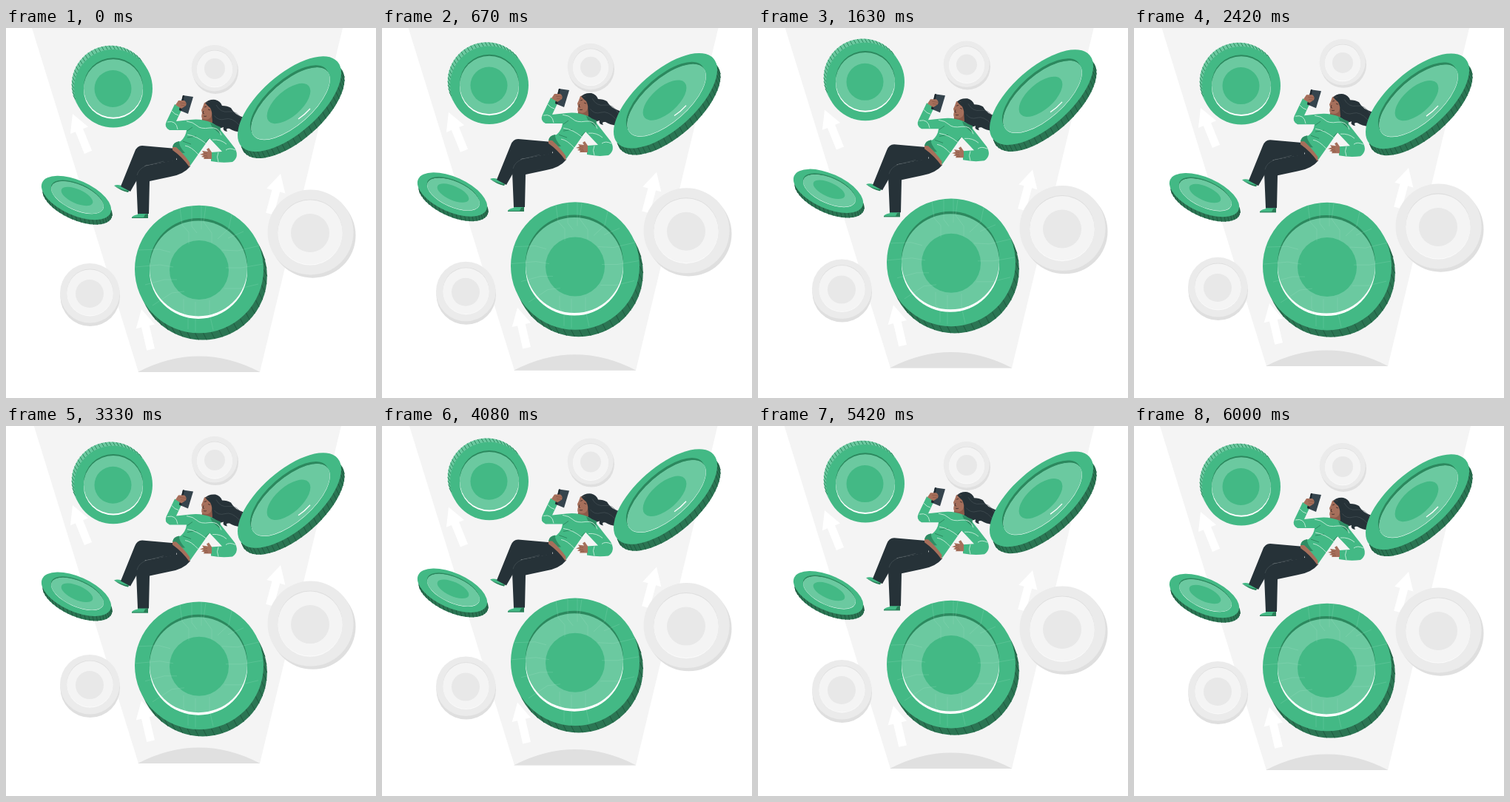
An HTML page for the animation above (6040 ms loop, 500 by 500 pixels).

```html
<!DOCTYPE html>
<html lang="en">
<head>
<meta charset="utf-8">
<title>Floating coins</title>
<style>
  html, body { margin: 0; width: 100%; height: 100%; overflow: hidden; background: #fff; }
  svg { display: block; width: 100vw; height: 100vh; }
</style>
</head>
<body>
<svg viewBox="0 0 500 500">
  <defs>
    <path id="arrow" d="M0 0L13 24H5.5V56H-5.5V24H-13Z" fill="#fff"/>
  </defs>

  <g id="backdrop">
    <path d="M35 0L179 465H343L455 0Z" fill="#f4f4f4"/>
    <path d="M178 465Q261 422 343.500 465Z" fill="#e0e0e0"/>
    <use href="#arrow" transform="translate(90 116) rotate(-22)"/>
    <use href="#arrow" transform="translate(371 197) rotate(15)"/>
    <use href="#arrow" transform="translate(183 380) rotate(-13)"/>
  </g>

  <g id="woman">
    <!-- legs and shoes -->
    <path d="M156 211L167 218L165 222Q155 219 146 213Q150 211 156 213Z" fill="#43b985"/>
    <path d="M146 213Q156 219 166 220L165 222Q155 220 146 213Z" fill="#2a7b56"/>
    <path d="M230 163L184 159Q177 159 174 167L155 214L168 221L188 186L230 179Z" fill="#263238"/>
    <path d="M178 250L192 250L192 257H170Q169 254 178 252Z" fill="#43b985"/>
    <path d="M170 256L186 256L188 252L192 251V257H170Z" fill="#2a7b56"/>
    <path d="M225 162L238 167L249 187Q240 198 222 201L194 207L193 251H178L176 203Q176 190 189 186L231 178Z" fill="#263238"/>
    <path d="M177 199Q179 190 190 186L213 180" fill="none" stroke="#4a565c" stroke-width=".6"/>
    <!-- neck, hair and face -->
    <path d="M268 102Q274 96 283 97Q290 99 292 105Q299 105 304 108Q308 115 314 118L321 121Q323 134 318 141Q308 140 302 136Q296 135 299 140Q292 139 294 134Q284 138 277 130L275 106Z" fill="#263238"/>
    <path d="M284 104Q290 115 301 113T320 125M281 118Q287 126 296 123T316 132" fill="none" stroke="#4a565c" stroke-width=".6"/>
    <path d="M278 113L279 127L274 134L264 131L265 122Z" fill="#8c5a49"/>
    <path d="M268 101Q275 99 278 106Q280 110 278 118Q275 126 266 123Q263 121 265 115L264 111Q266 107 268 101Z" fill="#a66f5b"/>
    <path d="M269 101Q280 99 283 116L279 122Q279 114 276 108Q272 105 269 101Z" fill="#263238"/>
    <path d="M268 107L271 106M273 110L276 111M267 112L266 115L268 116M267 119Q269 120 271 119" fill="none" stroke="#3b2a28" stroke-width=".8"/>
    <!-- arms, sweater and waist -->
    <path d="M228 103L238 109L230 126L249 124Q264 122 278 128Q286 132 291 139L309 162Q316 174 306 181Q292 183 277 180L277 168L292 167L275 149L249 186Q240 174 225 162Q226 154 236 153Q243 147 244 138L221 138Q213 134 217 126Z" fill="#43b985"/>
    <path d="M276 128L290 134L289 143Q282 137 278 133Z" fill="#2f8d64"/>
    <path d="M225 161Q226 154 234 153Q233 159 242 169L238 169Q232 163 225 161Z" fill="#2f8d64"/>
    <path d="M225 161L230 161Q240 170 248.500 182L248 188Q238 174 225 165Z" fill="#a66f5b"/>
    <path d="M275 149L268 156M245 139L252 134M239 153L250 157M245 148L257 146" fill="none" stroke="#268058" stroke-width=".8"/>
    <path d="M224 112Q228 117 233 118M218 127Q230 124 232 137M244 126Q253 127 258 132T275 135T291 145M245 144Q258 146 270 156M242 159Q250 160 260 171M279 151Q290 150 298 157M287 168Q284 174 287 181M297 165Q302 161 310 165" fill="none" stroke="#c8ecdb" stroke-width=".9"/>
    <!-- hands and phone -->
    <path d="M239 91L253 93L246 116L234 111Z" fill="#35444d"/>
    <path d="M239 91L241 91L237 112L234 111Z" fill="#1c262c"/>
    <path d="M229 104L233 98L241 98Q245 101 243 105L237 109Z" fill="#a66f5b"/>
    <path d="M235 101L243 102M236 104L242 105" stroke="#80503f" stroke-width=".6"/>
    <path d="M278 168L274 162L271 164L273 167L265 166L267 169L262 171L267 172L264 174L268 175L267 177L278 177Z" fill="#a66f5b"/>
    <path d="M267 169L272 170M267 172L272 173M268 175L273 175" stroke="#80503f" stroke-width=".6"/>
  </g>

  <g id="coins"></g>
</svg>

<script>
const svgNS = "http://www.w3.org/2000/svg";
const byId = id => document.getElementById(id);

function add(parent, tag, attributes) {
  const node = document.createElementNS(svgNS, tag);
  for (const key in attributes) node.setAttribute(key, attributes[key]);
  return parent.appendChild(node);
}

const green = { face: "#43b985", edge: "#2b7553", tick: "#1f5a40", shade: "#2c885e", rim: "#fff", dish: "#6bc9a0", emblem: "#43b985" };
const litGreen = { ...green, edge: "#6bc9a0", tick: "#2c885e" };
const gray = { face: "#ebebeb", edge: "#dfdfdf", shade: "#dedede", rim: "#fafafa", dish: "#f4f4f4", emblem: "#e8e8e8" };

// face, dish, emblem: [cx, cy, rx, ry]; edge, shade, rim: [dx, dy] offsets
function drawCoin(parent, { colors, face, dish, emblem, edge, shade, rim, tilt = 0, ticks = 0 }) {
  const ellipse = ([cx, cy, rx, ry], fill, [dx, dy] = [0, 0]) =>
    add(parent, "ellipse", { rx, ry, fill, transform: `translate(${cx + dx} ${cy + dy}) rotate(${tilt})` });

  ellipse(face, colors.edge, edge);
  if (ticks) add(parent, "path", { d: tickPath(face, edge, tilt, ticks), stroke: colors.tick, "stroke-width": 1 });
  ellipse(face, colors.face);
  ellipse(dish, colors.shade, shade);
  ellipse(dish, colors.rim, rim);
  ellipse(dish, colors.dish);
  ellipse(emblem, colors.emblem);
}

// Short strokes across the visible side of the edge
function tickPath([cx, cy, rx, ry], [dx, dy], tilt, count) {
  const turn = tilt * Math.PI / 180, cos = Math.cos(turn), sin = Math.sin(turn);
  const rotate = (x, y) => [x * cos - y * sin, x * sin + y * cos];
  let d = "";
  for (let i = 0; i < count; i++) {
    const angle = i / count * 2 * Math.PI;
    const [x, y] = rotate(rx * Math.cos(angle), ry * Math.sin(angle));
    const [nx, ny] = rotate(Math.cos(angle) / rx, Math.sin(angle) / ry);
    const facing = (nx * dx + ny * dy) / (Math.hypot(nx, ny) * Math.hypot(dx, dy));
    if (facing > 0.2) d += `M${cx + x} ${cy + y}l${dx} ${dy}`;
  }
  return d;
}

const grayCoins = [
  { face: [281.700, 54.200, 31, 31.200], dish: [282, 55, 24, 24.500], edge: [1.300, 3.500], shade: [0, -.8], rim: [0, .8], emblem: [282, 55, 14, 14] },
  { face: [411.500, 276, 58, 57.500], dish: [411, 276, 43.500, 43.500], edge: [3, 4.200], shade: [0, -1.100], rim: [0, 1.100], emblem: [411, 277, 26, 26] },
  { face: [113.300, 358.200, 40.300, 40.300], dish: [113.500, 357.500, 31, 31], edge: [.4, 4.500], shade: [0, -.9], rim: [0, .9], emblem: [113, 359, 19, 19] }
];

const greenCoins = [
  { colors: litGreen, face: [145, 81.700, 53, 52.700], dish: [145, 81.500, 40, 39.300], edge: [-3.200, -5.300], shade: [0, -2], rim: [0, 2], emblem: [144.500, 82, 25, 25], ticks: 66 },
  { face: [383, 102.700, 86.500, 39.500], dish: [384.500, 102, 66, 29], edge: [4.500, 9], shade: [-1.500, -3], rim: [.2, .5], emblem: [382, 102, 36, 17.500], tilt: -41.300, ticks: 60 },
  { face: [95, 229.500, 50.500, 23.500], dish: [96.500, 229, 38, 17], edge: [1.500, 6.500], shade: [-.4, -1.600], rim: [0, .4], emblem: [96, 227.500, 23, 9.500], tilt: 24, ticks: 50 },
  { face: [261, 326, 87, 86.300], dish: [260, 325, 66, 64.500], edge: [4.800, 9.300], shade: [0, -3.500], rim: [0, 3.500], emblem: [261, 327, 40, 40], ticks: 50 }
];

grayCoins.forEach(coin => drawCoin(byId("backdrop"), { colors: gray, ...coin }));
greenCoins.forEach(coin => drawCoin(byId("coins"), { colors: green, ...coin }));

// Glint on the tilted coin
add(byId("coins"), "path", { d: "M395 123Q404 117 411 109", fill: "none", stroke: "#fff", "stroke-width": 1.3 });

// Faint circuit traces on the large coin
add(byId("coins"), "path", {
  d: "M235 243L238 266L247 276V292M251 240V268L258 277M264 240V272M270 241L267 262L278 277V290" +
     "M305 252L301 271L286 285M321 275L300 284M343 294L313 301L292 300M347 319L318 324H297M341 346L316 352H295" +
     "M175 323L208 320L226 323M179 300L207 299L222 303M188 347L214 340H231M198 375L224 358L241 356" +
     "M246 407V391L240 383V366M256 410V370M280 408L275 386V368",
  fill: "none", stroke: "#b5e6cf", "stroke-width": .6, opacity: .3
});

const loopMs = 6040, frameCount = 145, rise = 10;
const floaters = [
  { node: byId("backdrop"), period: 6000 },
  { node: byId("coins"), period: 3000 },
  { node: byId("woman"), period: 1500 }
];

// Linear float up and back, stepped at 24 pictures per second
function render(now) {
  const step = Math.floor((now % loopMs) / loopMs * frameCount + 0.13);
  const time = step * 1000 / 24;
  for (const { node, period } of floaters) {
    const phase = (time / period) % 1;
    const lift = rise * (1 - Math.abs(1 - 2 * phase));
    node.setAttribute("transform", `translate(0 ${-lift.toFixed(3)})`);
  }
}

const start = performance.now();
function tick() {
  render(performance.now() - start);
  requestAnimationFrame(tick);
}
tick();
</script>
</body>
</html>
```
